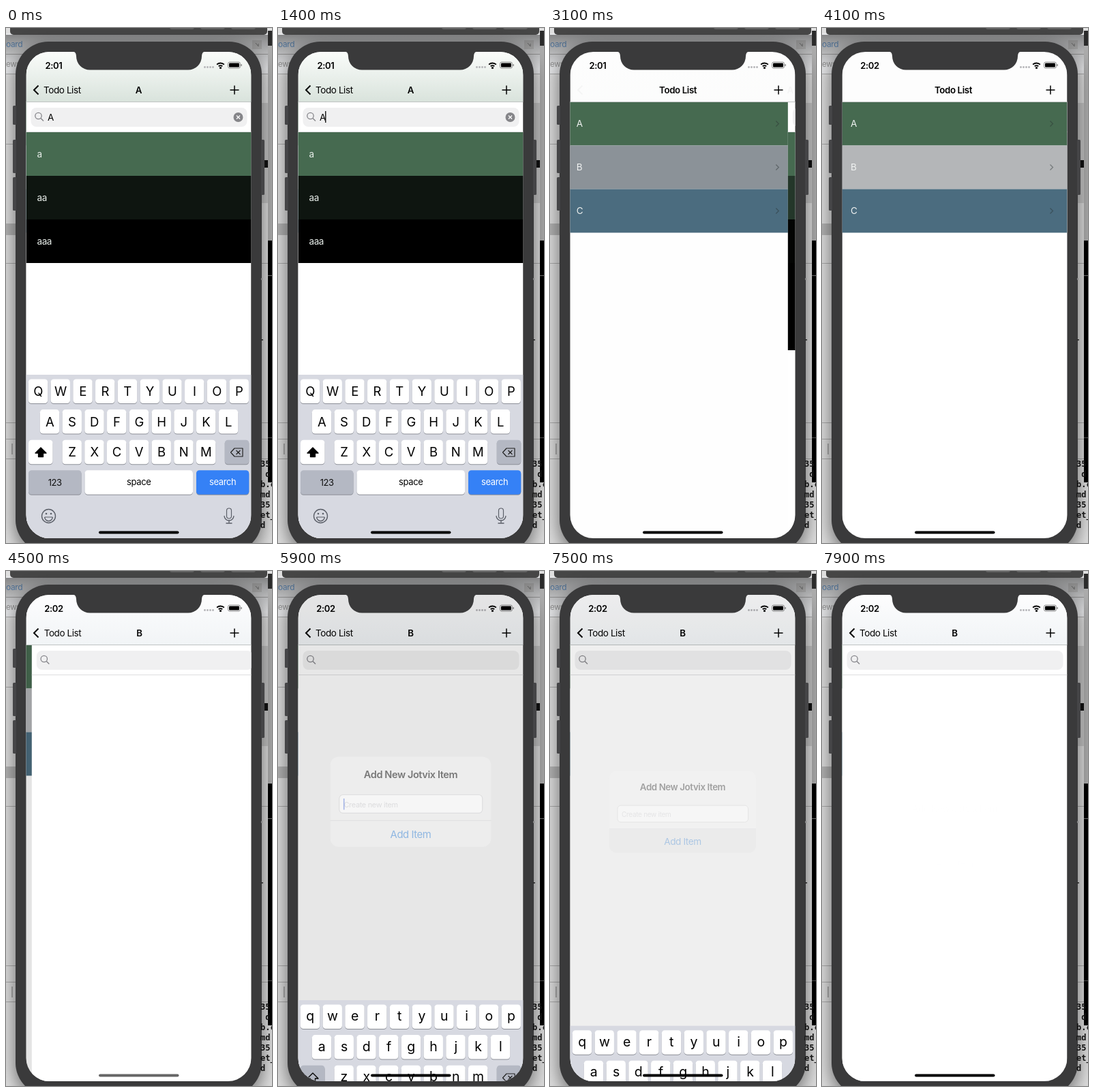
Recreate the animation shown at these times as an HTML page with a canvas. Size 390x756 px, loop 8 s.

```html
<!DOCTYPE html>
<html lang="en">
<head>
<meta charset="utf-8">
<title>Todo app</title>
<style>
html, body { margin: 0; width: 100%; height: 100%; overflow: hidden; background: #ddd; }
canvas { display: block; width: 390px; height: 756px; }
</style>
</head>
<body>
<canvas id="stage" width="390" height="756"></canvas>
<script>
const c = document.getElementById('stage').getContext('2d');
const LOOP = 8000, W = 330, LEFT = 29.5, MID = 194.5;
const CLEAR = 1950, POP = 2750, MINUTE = 3600, PUSH = 4130, OPEN = 5790, CLOSE = 7350;

// Critically damped spring from 0 to 1
function spring(ms) {
  const x = Math.max(0, ms) * 0.015;
  return 1 - (1 + x) * Math.exp(-x);
}

function box(x, y, w, h, r, fill) {
  c.beginPath();
  c.roundRect(x, y, w, h, r);
  c.fillStyle = fill;
  c.fill();
}

function rect(x, y, w, h, fill) {
  c.fillStyle = fill;
  c.fillRect(x, y, w, h);
}

function line(points, color = '#000', width = 1.5) {
  c.beginPath();
  for (let i = 0; i < points.length; i += 2) c.lineTo(points[i], points[i + 1]);
  c.strokeStyle = color;
  c.lineWidth = width;
  c.stroke();
}

function arc(x, y, r, color, width = 1.2, from = 0, to = 7) {
  c.beginPath();
  c.arc(x, y, r, from, to);
  c.strokeStyle = color;
  c.lineWidth = width;
  c.stroke();
}

function disc(x, y, r, fill) {
  c.beginPath();
  c.arc(x, y, r, 0, 7);
  c.fillStyle = fill;
  c.fill();
}

function text(s, x, y, size = 13.5, fill = '#000', align = 'left', weight = 400) {
  c.font = `${weight} ${size}px Inter, Roboto, sans-serif`;
  c.letterSpacing = size * -0.03 + 'px';
  c.textAlign = align;
  c.textBaseline = 'alphabetic';
  c.fillStyle = fill;
  c.fillText(s, x, y + size * 0.36);
}

function fade(alpha, draw) {
  if (alpha <= 0) return;
  c.save();
  c.globalAlpha *= Math.min(1, alpha);
  draw();
  c.restore();
}

function shade(y0, y1, top, bottom) {
  const g = c.createLinearGradient(0, y0, 0, y1);
  g.addColorStop(0, top);
  g.addColorStop(1, bottom);
  return g;
}

function desktop() {
  rect(0, 0, 390, 756, '#dfdfdf');
  rect(0, 8, 390, 60, '#e6e7e9');
  for (const y of [38, 67, 170, 345, 579, 603, 632]) rect(0, y, 390, 1, '#aaa');
  rect(0, 287, 15, 17, '#b4b4b4');
  rect(8.5, 610, 1, 16, '#777');
  rect(374, 110, 16, 147, '#c6c6c6');
  rect(374, 194, 16, 11, '#111');
  text('oard', 0, 24, 12, '#6f9fd2');
  text('ews', 0, 53, 11.5, '#999');
  rect(361, 18, 14, 13, '#d2d2d2');
  line([366, 22, 370, 27, 370, 23], '#888', 1);
  rect(0, 10, 390, 50, shade(10, 60, 'rgba(0,0,0,.42)', 'rgba(0,0,0,0)'));

  rect(384, 26, 6, 286, '#adadad');
  rect(384, 4, 6, 22, '#2b2b2b');
  rect(384, 312, 6, 355, '#000');
  rect(384, 363, 6, 1, '#777');
  rect(384, 601, 6, 1, '#555');
  box(6, -10, 377, 20, 5, '#464646');
  for (const x of [240, 285, 330]) box(x, -10, 36, 12, 3, '#626262');
}

function terminal() {
  c.font = 'bold 12px "DejaVu Sans Mono", monospace';
  c.letterSpacing = '0px';
  c.textAlign = 'left';
  c.textBaseline = 'middle';
  c.fillStyle = '#111';
  ['35', ' d', 'b.c', 'md', '35', 'et_', 'd'].forEach((s, i) => c.fillText(s, 373, 641 + 15 * i));
  rect(374, 457, 3, 1.5, '#222');
  rect(374, 367, 2, 3, '#888');
}

function phone() {
  c.save();
  c.shadowColor = 'rgba(0,0,0,.55)';
  c.shadowBlur = 28;
  c.shadowOffsetY = 8;
  box(14, 20, 361, 750, 48, '#3a3a3b');
  c.restore();
  for (const [x, y, h] of [[10, 114, 28], [10, 164, 49], [10, 219, 49], [374, 164, 81]])
    box(x, y, 5, h, 1.5, '#454547');
  terminal();
}

function searchIcon(x) {
  arc(x - 1, 129, 4.7, '#85858a', 1.3);
  line([x + 2.5, 132.5, x + 6.5, 136.5], '#85858a', 1.4);
}

function homeList(x, selected) {
  rect(x, 108, W, 642, '#fff');
  ['#466a50', '#8c9399', '#4b6c7f'].forEach((color, i) => {
    const y = 108.5 + 64 * i;
    rect(x, y, W, 64, selected === i ? '#b4b6b8' : color);
    text('ABC'[i], x + 12.5, y + 32, 13.5, '#f1f3f2');
    line([x + 305, y + 28, x + 309, y + 32, x + 305, y + 36], 'rgba(40,50,50,.45)', 1.3);
  });
}

function detail(x, query, rows, caret) {
  rect(x, 108, W, 642, '#fff');
  box(x + 7, 117, 317, 28, 8, '#f0f0f1');
  searchIcon(x + 19);
  rect(x, 152, W, 1, '#dedee0');
  if (query) {
    text(query, x + 31.5, 131);
    disc(x + 311, 131, 7, '#858589');
    line([x + 308.5, 128.5, x + 313.5, 133.5], '#fff', 1.2);
    line([x + 313.5, 128.5, x + 308.5, 133.5], '#fff', 1.2);
  }
  if (caret) rect(x + 39.5, 122, 1.5, 17, '#222');
  rows.forEach((s, i) => {
    // Each row loses brightness by its share of the list
    const k = Math.max(0, 1 - i / rows.length * 2.4);
    const y = 153 + 64 * i;
    rect(x, y, W, 64, `rgb(${70 * k},${106 * k},${80 * k})`);
    text(s, x + 16, y + 32, 13.5, '#e9efeb');
  });
}

// depth: 0 = home list, 1 = inside a list
function navBar(depth, title) {
  const k = (1 - depth) ** 1.4;
  rect(LEFT, 35, W, 73, '#fdfdfd');
  fade(depth, () => rect(LEFT, 35, W, 73, title === 'A'
    ? shade(35, 108, '#fafcfa', '#d9e3dc') : shade(35, 108, '#fdfdfe', '#f1f4f6')));
  rect(LEFT, 108, W, 1, '#bfc3c3');
  fade(depth, () => {
    line([47.5, 84.5, 41, 91, 47.5, 97.5], '#000', 2);
    text('Todo List', 55 + 109 * k, 91);
    text(title, MID + 165 * k, 91, 13.3, '#000', 'center', 600);
  });
  fade(1 - depth * 1.1, () => text('Todo List', 192.5 - 109 * (1 - k), 91, 13.3, '#000', 'center', 600));
  line([328.5, 91, 341.5, 91]);
  line([335, 84.5, 335, 97.5]);
}

function statusBar(time) {
  text(time, 70, 55, 13, '#000', 'center', 600);
  for (let i = 0; i < 4; i++) disc(291.5 + 4 * i, 57.5, 1.4, '#b5b5b8');
  for (const r of [3.8, 7.6]) arc(314.5, 59, r, '#000', 2, -2.35, -0.79);
  disc(314.5, 58.5, 1.6, '#000');
  c.beginPath();
  c.roundRect(325.5, 50, 18, 9, 2.5);
  c.strokeStyle = '#777';
  c.lineWidth = 0.8;
  c.stroke();
  box(327, 51.5, 15, 6, 1.2, '#000');
  rect(344.5, 53, 1.2, 3, '#777');
}

function key(x, y, w, fill = '#fff') {
  box(x, y + 1, w, 35.5, 4.5, '#8d9098');
  box(x, y, w, 35.5, 4.5, fill);
}

function keyboard(shown, upper) {
  if (shown <= 0.002) return;
  const grey = '#b4b8c3';
  c.save();
  c.translate(0, 240 * (1 - shown));
  rect(LEFT, 509, W, 241, '#d7d9e1');
  [['QWERTYUIOP', 47], ['ASDFGHJKL', 64], ['ZXCVBNM', 96.7]].forEach(([letters, x0], row) => {
    const y = 515.5 + 44.6 * row;
    [...letters].forEach((ch, i) => {
      const x = x0 + 32.75 * i;
      key(x - 14.2, y, 28.4);
      text(upper ? ch : ch.toLowerCase(), x, y + (upper ? 18 : 16.5), upper ? 18.5 : 19.5, '#000', 'center');
    });
  });

  key(33, 604.7, 35.5, upper ? '#fff' : grey);
  c.beginPath();
  for (const [x, y] of [[51, 616], [59, 624], [54.5, 624], [54.5, 629.5], [47.5, 629.5], [47.5, 624], [43, 624]])
    c.lineTo(x, y);
  c.closePath();
  c.lineJoin = 'round';
  c.lineWidth = 1.3;
  c.strokeStyle = c.fillStyle = '#000';
  c.stroke();
  if (upper) c.fill();

  key(320.8, 604.7, 35.5, grey);
  line([329.5, 623, 335, 617, 347, 617, 347, 629, 335, 629, 329.5, 623, 335, 617], '#222', 1.2);
  line([337.5, 620, 343.5, 626], '#222', 1.2);
  line([343.5, 620, 337.5, 626], '#222', 1.2);

  key(33, 649.3, 77.5, grey);
  key(115.5, 649.3, 158.5);
  key(279, 649.3, 77.3, upper ? '#3581f6' : grey);
  text('123', 71.7, 667, 13, '#111', 'center');
  text('space', 194.7, 666.5, 13, '#000', 'center');
  text(upper ? 'search' : 'return', 317.6, 666.5, 13, upper ? '#fff' : '#111', 'center');

  const ink = '#5b5f68';
  arc(62.5, 716.5, 10, ink, 1.4);
  arc(62.5, 718, 5.8, ink, 1.4, 0, Math.PI);
  line([56.7, 718, 68.3, 718], ink, 1.2);
  disc(59, 713, 1.3, ink);
  disc(66, 713, 1.3, ink);
  c.beginPath();
  c.roundRect(323.5, 705, 7, 15, 3.5);
  c.stroke();
  arc(327, 716, 7, ink, 1.3, 0, Math.PI);
  line([327, 723, 327, 727], ink, 1.3);
  line([322.5, 727, 331.5, 727], ink, 1.3);
  c.restore();
}

function dialog(alpha, scale, y, caret, pressed) {
  fade(alpha, () => {
    c.translate(MID, y);
    c.scale(scale, scale);
    c.translate(-MID, -291);
    box(87, 231, 215, 120.5, 11, '#f3f3f3');
    if (pressed) box(87, 317, 215, 34.5, [0, 0, 11, 11], '#dedede');
    text('Add New Jotvix Item', MID, 255, 13.3, '#000', 'center', 600);
    box(99, 282, 191.5, 24.5, 5, '#fff');
    c.strokeStyle = '#c9c9cb';
    c.lineWidth = 1;
    c.stroke();
    text('Create new item', 105, 295, 10, '#c3c3c6');
    if (caret) rect(104.5, 287, 1.5, 15, '#5675d8');
    rect(87, 316, 215, 1, '#d2d2d4');
    text('Add Item', MID, 335, 13.6, '#2f7fd6', 'center');
  });
}

function screen(t) {
  const popped = spring(t - POP), pushed = spring(t - PUSH);
  const second = t >= MINUTE;
  const depth = second ? pushed : 1 - popped;
  const opened = spring(t - OPEN), closed = spring(t - CLOSE);
  const open = opened * (1 - closed);

  homeList(LEFT - 0.3 * W * depth, t > PUSH - 80 ? 1 : -1);
  rect(LEFT, 108, W, 642, `rgba(0,0,0,${0.11 * depth})`);
  const x = LEFT + W * (1 - depth);
  if (second) detail(x, '', [], false);
  else if (t < CLEAR) detail(x, 'A', ['a', 'aa', 'aaa'], t % 1000 >= 250 && t % 1000 < 750);
  else detail(x, '', ['a', 'aa', 'aaa', 'b', 'bb'], false);
  navBar(depth, second ? 'B' : 'A');
  statusBar(t < MINUTE ? '2:01' : '2:02');

  rect(LEFT, 35, W, 715, `rgba(0,0,0,${0.19 * open})`);
  if (t < OPEN) keyboard(1 - spring(t - CLEAR), true);
  else {
    const caret = (t - 5850) % 1000 < 500;
    dialog(opened * (1 - closed), 1.19 - 0.19 * opened, 385 - 94 * open, caret, t > CLOSE - 90);
    keyboard(open, false);
  }
  box(136, 738.5, 117.5, 4, 2, t > PUSH && t < PUSH + 450 ? '#666' : '#000');
}

function notch() {
  c.beginPath();
  c.moveTo(97, 34);
  c.quadraticCurveTo(103, 35, 103, 41);
  c.arcTo(103, 61.5, 124, 61.5, 20);
  c.arcTo(287, 61.5, 287, 41, 20);
  c.lineTo(287, 41);
  c.quadraticCurveTo(287, 35, 293, 34);
  c.fillStyle = '#3a3a3b';
  c.fill();
}

function frame(now) {
  const t = now % LOOP;
  desktop();
  phone();
  c.save();
  c.beginPath();
  c.roundRect(LEFT, 35, W, 714, 34);
  c.clip();
  screen(t);
  c.restore();
  notch();
  requestAnimationFrame(frame);
}
requestAnimationFrame(frame);
</script>
</body>
</html>
```
